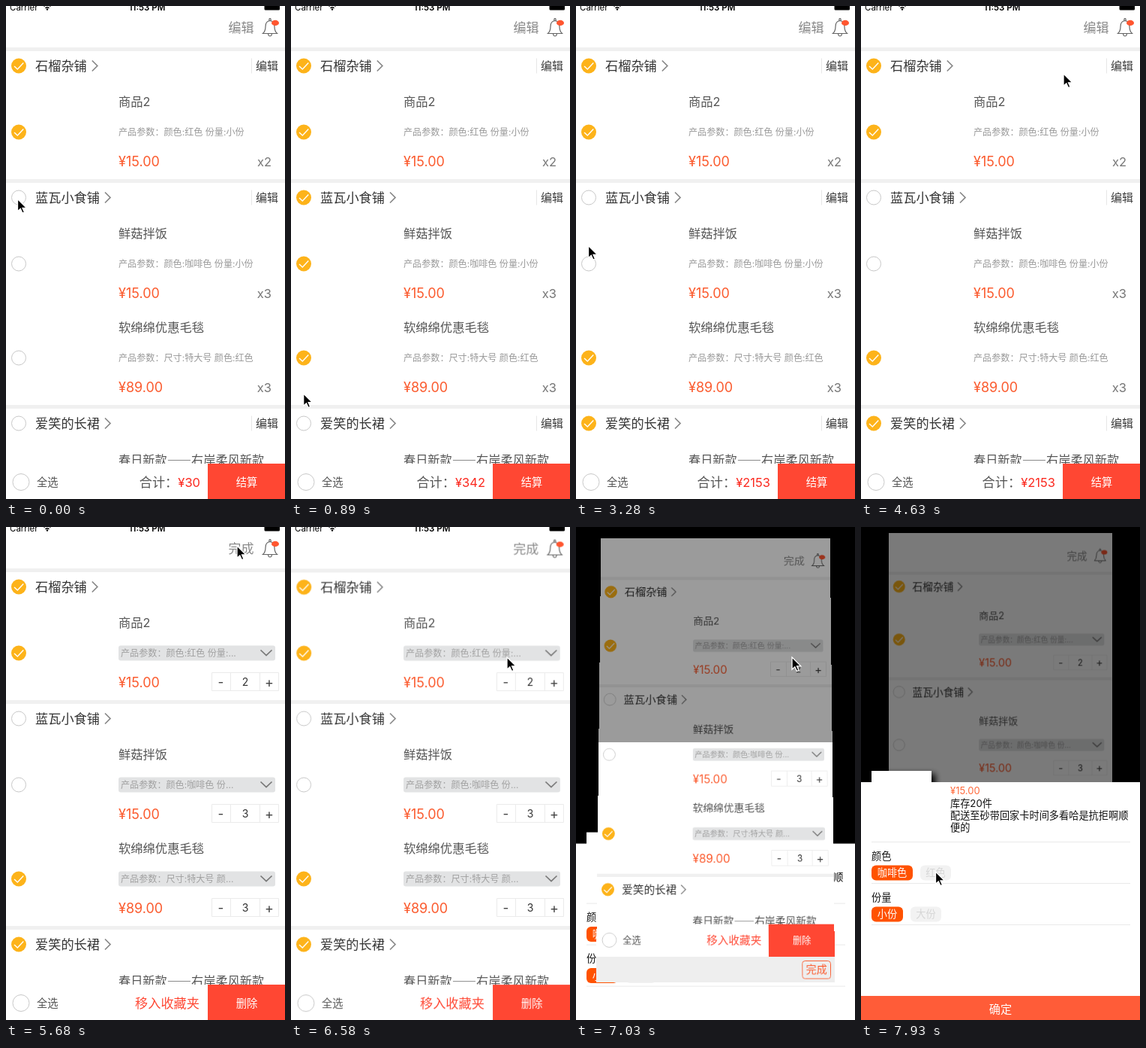
These frames come from a looping animation (372 px wide and 655 px high, 8 s). An HTML page:

```html
<!DOCTYPE html>
<html lang="zh-CN">
<head>
<meta charset="utf-8">
<style>
html, body { margin: 0; width: 100%; height: 100%; overflow: hidden; background: #000; }
#stage { position: relative; width: 372px; height: 655px; overflow: hidden; background: #000; isolation: isolate; }
#stage > * { position: absolute; left: 0; top: 0; display: block; }
svg { font-family: Inter, "Noto Sans CJK SC", "Noto Sans CJK JP", sans-serif; }
#page { top: -9px; transform-origin: 186px 332px; }
#dim { width: 372px; height: 655px; background: #000; }
</style>
</head>
<body>
<div id="stage">
  <svg id="page" width="372" height="706" viewBox="0 -9 372 706"></svg>
  <div id="dim"></div>
  <svg id="sheet" width="372" height="655"></svg>
  <svg id="status" width="372" height="12">
    <text x="5" y="5.500" font-size="11.500">Carrier</text>
    <text x="188" y="5.500" font-size="11.500" font-weight="600" text-anchor="middle">11:53 PM</text>
    <path d="M50.500 .5q4.500-4 9 0M52.500 2.800q2.500-2 5 0" fill="none" stroke="#000" stroke-width="1.500"/>
    <circle cx="55" cy="4.500" r="1.200"/>
    <rect x="344.500" y="-4" width="20.500" height="9.500" rx="1.500"/>
  </svg>
  <svg id="cursor" width="17" height="23" viewBox="-1.500 -1.500 17 23">
    <path d="M0 0V16.200L3.800 12.800 6.400 18.600 9 17.500 6.500 11.800H11.800Z" stroke="#fff" stroke-width="1.300"/>
  </svg>
</div>
<script>
const LOOP = 8000;
const $ = id => document.getElementById(id);
const page = $('page'), dim = $('dim'), sheet = $('sheet'), cursor = $('cursor');

// y is the vertical middle of the line
const text = (x, y, size, fill, str, extra = '') =>
  `<text x="${x}" y="${y + size * .37}" font-size="${size}" fill="${fill}" ${extra}>${str}</text>`;
const MID = 'text-anchor="middle"', END = 'text-anchor="end"';
const rect = (x, y, w, h, fill, extra = '') =>
  `<rect x="${x}" y="${y}" width="${w}" height="${h}" fill="${fill}" ${extra}/>`;
const line = (d, color, width = 1) =>
  `<path d="${d}" fill="none" stroke="${color}" stroke-width="${width}"/>`;

const check = (x, y, on, r = 10) => on
  ? `<circle cx="${x}" cy="${y}" r="${r}" fill="#fdb31a"/>` + line(`M${x - 6} ${y + .5}l4.300 4 8-8.500`, '#fff', 1.4)
  : `<circle cx="${x}" cy="${y}" r="${r - .5}" fill="#fff" stroke="#c8c8c8"/>`;

function shop(y, name, on, edit) {
  const end = 39 + name.length * 17.2;
  return rect(0, y - 24.5, 372, 5, '#f0f0f0') + check(17, y, on) + text(39, y, 17.2, '#333', name) +
    line(`M${end + 7} ${y - 7}l7 7-7 7`, '#888', 1.7) +
    (edit ? '' : line(`M327.500 ${y - 10}v20`, '#e6e6e6') + text(333, y, 15, '#3a3a3a', '编辑'));
}

function item(y, { name, spec, short, price, count }, on, edit) {
  let s = check(17, y, on) + text(150, y - 40.5, 16.3, '#555', name) + text(150, y + 38.5, 18, '#fb5a2d', '¥' + price);
  if (!edit) return s + text(150, y, 12.1, '#999', '产品参数：' + spec) + text(354, y + 39.5, 16.5, '#777', 'x' + count, END);
  s += rect(150, y - 10, 209, 20, '#e2e3e4', 'rx="3"') + text(153, y, 12.1, '#a0a0a0', '产品参数：' + short + '...') +
    line(`M339.500 ${y - 4}l7.500 7 7.500-7`, '#777', 1.7);
  return s + line(`M274.500 ${y + 26}h89v24h-89zM299.500 ${y + 26}v24M338.500 ${y + 26}v24`, '#ebebeb') +
    text(286.5, y + 38, 17, '#444', '-', MID) + text(319, y + 38, 14, '#333', count, MID) + text(351, y + 38.5, 18, '#444', '+', MID);
}

const goods = [
  { name: '商品2', spec: '颜色:红色 份量:小份', short: '颜色:红色 份量:', price: '15.00', count: 2 },
  { name: '鲜菇拌饭', spec: '颜色:咖啡色 份量:小份', short: '颜色:咖啡色 份', price: '15.00', count: 3 },
  { name: '软绵绵优惠毛毯', spec: '尺寸:特大号 颜色:红色', short: '尺寸:特大号 颜', price: '89.00', count: 3 }
];

const bell = line('M342.500 36.500q3.500-3 3.500-9 0-7.500 6-8 6 .5 6 8 0 6 3.500 9zM349.500 37q.5 3 2.500 3t2.500-3M351 19.500q-.5-3 1-3t1 3', '#666', 1.2) +
  '<ellipse cx="359" cy="22.500" rx="5" ry="3.700" fill="#ff5630"/>';

function drawPage(food, blanket, coat, edit) {
  const total = 30 + 45 * food + 267 * blanket + 1856 * coat;
  const all = food && blanket && coat;
  page.innerHTML = rect(0, -9, 372, 706, '#fff') + text(296.5, 28.5, 17, '#888', edit ? '完成' : '编辑') + bell +
    shop(79.5, '石榴杂铺', true, edit) + item(167.5, goods[0], true, edit) +
    shop(254.5, '蓝瓦小食铺', food && blanket, edit) +
    item(342.5, goods[1], food, edit) + item(467.5, goods[2], blanket, edit) +
    shop(554.5, '爱笑的长裙', coat, edit) +
    text(150, 603, 16.2, '#555', '春日新款——右岸柔风新款', 'style="font-family:\'Noto Sans CJK SC\',sans-serif"') +
    rect(0, 608, 372, 50, '#fff') + check(20, 632.5, all, 11.5) + text(41, 632.5, 14.3, '#555', '全选') +
    (edit ? text(172, 633, 17.2, '#ff4733', '移入收藏夹')
          : text(259, 633, 17.2, '#555', `合计：<tspan font-size="16.500" fill="#fb2a20">¥${total}</tspan>`, END)) +
    rect(269, 608, 103, 50, '#ff4733') + text(321, 633, 14.3, '#fff', edit ? '删除' : '结算', MID) +
    rect(0, 658, 372, 39, '#eee') + rect(321.5, 664.5, 44, 27, 'none', 'rx="4" stroke="#fb5a2d"') +
    text(343.5, 678, 16.5, '#fb5a2d', '完成', MID);
}

const pill = (x, y, w, label, on) =>
  rect(x, y, w, 20, on ? '#ff5200' : '#f2f2f2', 'rx="6"') + text(x + w / 2, y + 10, 13.2, on ? '#fff' : '#d6d6d6', label, MID);

sheet.innerHTML = rect(14, 324, 80, 80, '#fff', 'style="filter:drop-shadow(5px 4px 4px #000)"') +
  rect(0, 339, 372, 316, '#fff') + text(119, 350, 13, '#ff6a3c', '¥15.00') +
  text(119, 367.5, 13.2, '#111', '库存20件') + text(119, 383.5, 13.2, '#111', '配送至砂带回家卡时间多看哈是抗拒啊顺') +
  text(119, 399, 13.2, '#111', '便的') + line('M14 418.500h345M14 473.500h345M14 528.500h345', '#e9e9e9') +
  text(14, 437, 13.2, '#111', '颜色') + pill(14, 449.5, 55, '咖啡色', true) + pill(79, 449.5, 41, '红色') +
  text(14, 492, 13.2, '#111', '份量') + pill(14, 504.5, 42, '小份', true) + pill(66, 504.5, 41, '大份') +
  rect(0, 623, 372, 32, '#ff5c38') + text(186, 640.5, 15.2, '#fff', '确定', MID);

// time, x, y of the pointer tip
const path = [
  [0, 15.5, 256.5], [290, 15.5, 256.5], [1040, 17, 585], [1490, 16.5, 622.5], [1940, 16.5, 622.5], [2080, 17, 597],
  [2690, 17, 345], [3130, 17, 345], [3280, 16.5, 318.5], [4030, 110, 262], [4780, 310, 47], [5080, 310, 39],
  [5530, 308, 25], [5830, 308, 25], [6480, 288, 173], [7180, 288, 173], [7930, 99.5, 458], [LOOP, 99.5, 458]
];
const smooth = (t, start, length) => {
  const u = Math.min(1, Math.max(0, (t - start) / length));
  return u * u * (3 - 2 * u);
};

let shown = '';
function render(t) {
  const state = [(t >= 130 && t < 2900), t >= 130, t >= 1600, t >= 5500];
  if (shown !== String(state)) {
    shown = String(state);
    drawPage(...state);
  }

  // the page tips back, then shrinks upright while the sheet rises
  const tip = smooth(t, 6560, 282), rise = smooth(t, 6842, 278);
  const tilted = rise < 1, lift = -49 * rise;
  page.style.transform = tip ? `perspective(893px) translateY(${lift}px) rotateX(${15 * tip * (1 - rise)}deg) scale(${1 - .05 * tip - .15 * rise})` : 'none';
  dim.style.opacity = .52 * rise;
  dim.style.height = (tilted ? 323 + lift : 655) + 'px';
  sheet.style.zIndex = tilted ? -1 : 0;
  sheet.style.visibility = rise ? 'visible' : 'hidden';
  sheet.style.transform = `translateY(${331 * (1 - rise)}px)`;

  const i = path.findIndex(p => p[0] > t);
  const [t0, x0, y0] = path[i - 1], [t1, x1, y1] = path[i];
  const u = (t - t0) / (t1 - t0);
  cursor.style.transform = `translate(${x0 + (x1 - x0) * u - 1.5}px, ${y0 + (y1 - y0) * u - 1.5}px)`;
}

const step = t => Math.max(0, Math.floor((t - 125) / 150) * 150 + 130);
function tick() {
  render(step(performance.now() % LOOP));
  requestAnimationFrame(tick);
}
tick();
</script>
</body>
</html>
```
